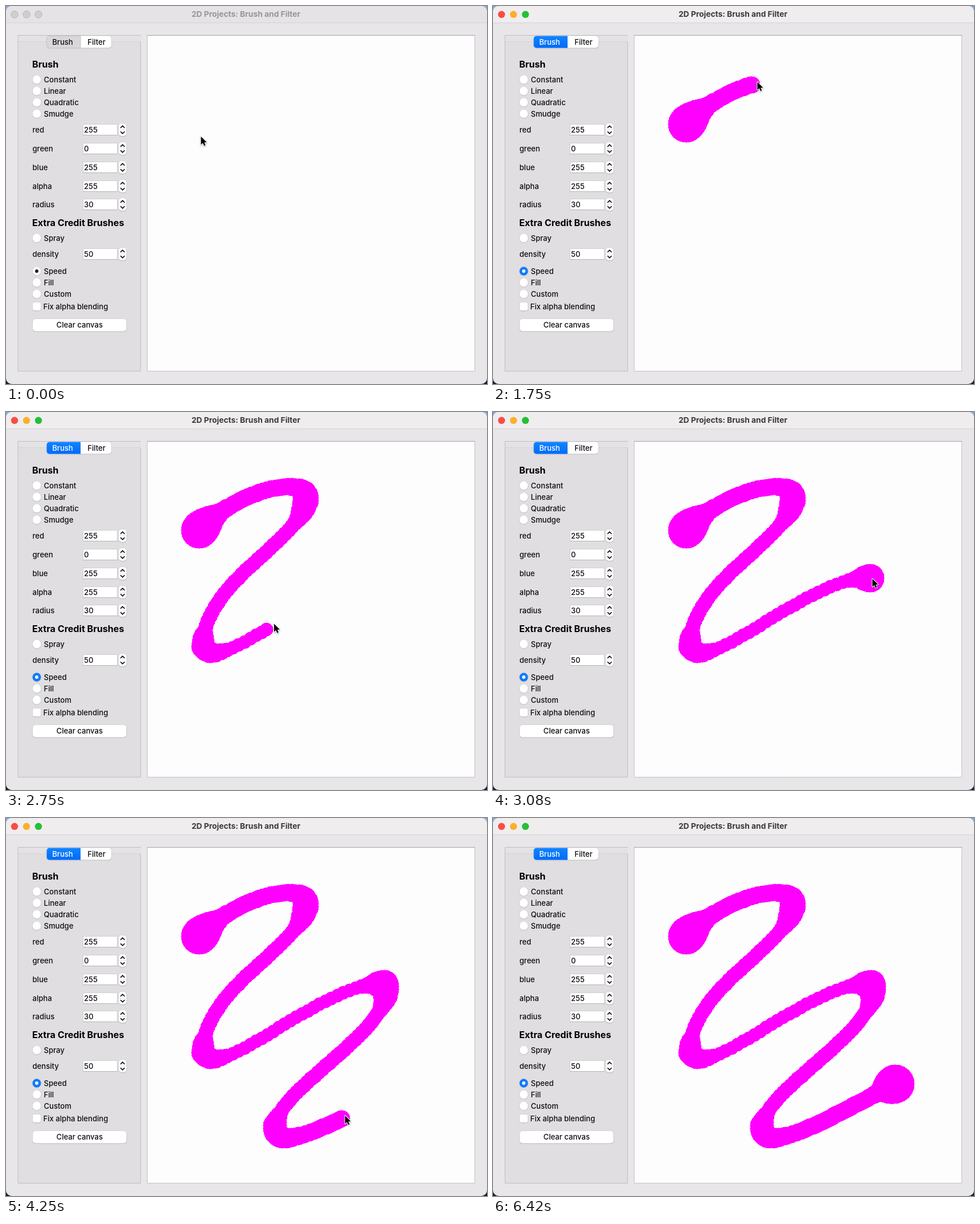
These frames come from a looping animation (845 by 663 pixels, 6.76 s). An HTML page with a canvas:

```html
<!DOCTYPE html>
<html lang="en">
<head>
<meta charset="utf-8">
<title>Brush and Filter</title>
<style>
  html, body { margin: 0; width: 100%; height: 100%; overflow: hidden; background: #e8e6e9; }
  canvas { display: block; width: 845px; height: 663px; }
</style>
</head>
<body>
<canvas id="stage" width="845" height="663"></canvas>
<script>
const ctx = document.getElementById('stage').getContext('2d');
const LOOP = 6760, FPS = 12;
const CLICK = 915, STROKE_START = 1330, STROKE_END = 4950, CURSOR_LEAVES = 5900;
const STAMP_GAP = 16, CURSOR_LEAD = 20;
const FONT = 'Inter, "Open Sans", sans-serif';
const DARK = '#0d0d0e';

// The hand slows at each turn; legs are Bezier curves from turn to turn.
const START = { x: 339, y: 207, r: 32, time: STROKE_START };
const LEGS = [
  { c1: [400, 140], c2: [530, 105], end: { x: 526, y: 152, r: 23, time: 1960 }, thin: 15 },
  { c1: [520, 226], c2: [344, 297], end: { x: 346, y: 410, r: 21, time: 2560 }, thin: 12.5 },
  { c1: [372, 470], c2: [560, 282], end: { x: 664, y: 291, r: 25, time: 3090 }, thin: 12 },
  { c1: [690, 368], c2: [472, 474], end: { x: 472, y: 544, r: 21, time: 3760 }, thin: 12.5 },
  { c1: [478, 594], c2: [600, 520], end: { x: 706, y: 466, r: 33.5, time: STROKE_END }, thin: 15 }
];
const BRAKING = 22, LAUNCH = 34, LEG_STEPS = 60;

const lerp = (a, b, k) => a + (b - a) * k;
const ease = v => { v = Math.max(0, Math.min(1, v)); return v * v * (3 - 2 * v); };
const falloff = (d, reach) => Math.exp(-((d / reach) ** 2));
const bezier = (a, b, c, d, k) => {
  const m = 1 - k;
  return m * m * m * a + 3 * m * m * k * b + 3 * m * k * k * c + k * k * k * d;
};

// The brush is wide when slow, so the radius also gives the pace.
function sampleLeg(start, { c1, c2, end, thin }) {
  const points = [];
  let length = 0, cost = 0;
  for (let i = 0; i <= LEG_STEPS; i++) {
    const k = i / LEG_STEPS, last = points[i - 1];
    const x = bezier(start.x, c1[0], c2[0], end.x, k);
    const y = bezier(start.y, c1[1], c2[1], end.y, k);
    if (last) length += Math.hypot(x - last.x, y - last.y);
    points.push({ x, y, at: length });
  }
  points.forEach((p, i) => {
    p.r = thin + (start.r - thin) * falloff(p.at, LAUNCH)
               + (end.r - thin) * falloff(length - p.at, BRAKING);
    if (i) cost += (p.at - points[i - 1].at) / (37 - p.r);
    p.cost = cost;
  });
  points.forEach(p => { p.t = lerp(start.time, end.time, p.cost / cost); });
  return points;
}
const path = LEGS.flatMap((leg, i) => sampleLeg(i ? LEGS[i - 1].end : START, leg));
const finish = path[path.length - 1];

function brushAt(t) {
  const i = path.findIndex(p => p.t > t);
  if (i < 0) return finish;
  if (i === 0) return path[0];
  const a = path[i - 1], b = path[i], k = (t - a.t) / (b.t - a.t);
  return { x: lerp(a.x, b.x, k), y: lerp(a.y, b.y, k), r: lerp(a.r, b.r, k) };
}

function cursorAt(t) {
  const arrive = 1 - ease((t - 80) / 640);
  const leave = ease((t - CURSOR_LEAVES) / 480);
  const tip = brushAt(t + CURSOR_LEAD);
  return { x: tip.x + 1.5 + 2 * arrive + 160 * leave, y: tip.y - 2 + 24 * arrive - 495 * leave };
}

function paint(fill, stroke) {
  if (fill) { ctx.fillStyle = fill; ctx.fill(); }
  if (stroke) { ctx.strokeStyle = stroke; ctx.lineWidth = 1; ctx.stroke(); }
}
function box(x, y, w, h, radius, fill, stroke) {
  ctx.beginPath();
  ctx.roundRect(x, y, w, h, radius);
  paint(fill, stroke);
}
function disc(x, y, r, fill, stroke) {
  ctx.beginPath();
  ctx.arc(x, y, r, 0, Math.PI * 2);
  paint(fill, stroke);
}
function rect(x, y, w, h, fill) {
  ctx.fillStyle = fill;
  ctx.fillRect(x, y, w, h);
}
function text(str, x, y, { size = 13.1, weight = 500, color = DARK, align = 'left' } = {}) {
  ctx.font = `${weight} ${size}px ${FONT}`;
  ctx.textAlign = align;
  ctx.fillStyle = color;
  ctx.fillText(str, x, y);
}
function raised(draw) {
  ctx.save();
  ctx.shadowColor = 'rgba(0,0,0,0.28)';
  ctx.shadowBlur = 1.6;
  ctx.shadowOffsetY = 0.6;
  draw();
  ctx.restore();
}

function drawWindow(active) {
  rect(0, 0, 845, 332, '#87aee3');
  rect(0, 332, 845, 331, '#17202f');
  box(0, 0, 845, 663, 10, '#e8e6e9');
  box(0, 0, 845, 30, [10, 10, 0, 0], active ? '#f0edef' : '#e6e3e6');
  rect(0, 29, 845, 1, '#d4d2d5');
  ['#fc4c45', '#fbb02b', '#27bf35'].forEach((color, i) =>
    disc(15 + 21 * i, 14.8, 6.2, active ? color : '#cfcdd0', active ? null : '#b7b5b8'));
  text('2D Projects: Brush and Filter', 421.5, 19,
    { size: 13.8, weight: 700, align: 'center', color: active ? '#3b393b' : '#979598' });

  box(21.5, 51.5, 215, 589, 0, '#e0dee1', '#bfbdc0');
  rect(22, 52, 215, 10, '#e4e2e5');
  rect(22, 62, 215, 1, '#d4d2d5');
  box(248.5, 51.5, 575, 589, 0, '#fefdfe', '#c3c1c4');
  rect(248, 51, 576, 1, '#a3a1a4');
}

function drawTabs(active) {
  raised(() => box(71.5, 52.5, 113.5, 21, 5, '#ffffff'));
  const blue = ctx.createLinearGradient(0, 52, 0, 74);
  blue.addColorStop(0, '#1285ff');
  blue.addColorStop(1, '#006af8');
  box(71.5, 52.5, 59.5, 21, [5, 0, 0, 5], active ? blue : '#d9d7da', active ? null : '#c8c6c9');
  text('Brush', 99.5, 68, { align: 'center', color: active ? '#ffffff' : DARK });
  text('Filter', 159, 68, { align: 'center' });
}

function radio(label, y, checked, active) {
  raised(() => disc(54, y, 7.4, checked && active ? '#0a7bff' : '#ffffff'));
  if (checked) disc(54, y, 2.9, active ? '#ffffff' : '#1e1d1f');
  text(label, 66.5, y + 4.9);
}

function chevron(y, dir) {
  ctx.beginPath();
  ctx.moveTo(201.6, y + 1.6 * dir);
  ctx.lineTo(204.8, y - 1.6 * dir);
  ctx.lineTo(208, y + 1.6 * dir);
  ctx.strokeStyle = '#1c1b1d';
  ctx.lineWidth = 1.7;
  ctx.lineCap = ctx.lineJoin = 'round';
  ctx.stroke();
}

function spinBox(label, value, y) {
  text(label, 46.5, y + 4.9);
  rect(135, y - 10, 61, 20, '#d0ced1');
  rect(136, y - 9, 59, 18, '#ffffff');
  rect(135, y + 9, 61, 1, '#b5b3b6');
  text(value, 137, y + 4.9);
  raised(() => box(198, y - 11, 13.6, 22, 5, '#ffffff'));
  rect(198, y - 0.5, 13.6, 1, '#e3e1e4');
  chevron(y - 5.3, 1);
  chevron(y + 5.3, -1);
}

function drawControls(active) {
  const heading = { size: 16.1, weight: 700, color: '#000000' };
  text('Brush', 46, 108, heading);
  ['Constant', 'Linear', 'Quadratic', 'Smudge'].forEach((s, i) => radio(s, 129 + 20 * i, false, active));
  Object.entries({ red: 255, green: 0, blue: 255, alpha: 255, radius: 30 })
    .forEach(([label, value], i) => spinBox(label, value, Math.round(217.2 + 32.8 * i)));
  text('Extra Credit Brushes', 46, 386, heading);
  radio('Spray', 407, false, active);
  spinBox('density', 50, 435);
  ['Speed', 'Fill', 'Custom'].forEach((s, i) => radio(s, 465 + 20 * i, s === 'Speed', active));
  raised(() => box(47, 520, 14, 14, 3, '#ffffff'));
  text('Fix alpha blending', 65.5, 532);
  raised(() => box(47, 549, 164.5, 21.5, 5, '#ffffff'));
  text('Clear canvas', 129.3, 564, { align: 'center' });
}

// Hard-edged round mask, one pixel row at a time.
function stamp({ x, y, r }) {
  const cx = Math.round(x), cy = Math.round(y), n = Math.round(r);
  for (let dy = -n; dy <= n; dy++) {
    const half = Math.floor(Math.sqrt(n * n - dy * dy));
    ctx.fillRect(cx - half, cy + dy, 2 * half + 1, 1);
  }
}

function drawStroke(t) {
  ctx.fillStyle = '#ff00ff';
  for (let s = STROKE_START; s < Math.min(t, STROKE_END); s += STAMP_GAP) stamp(brushAt(s));
  stamp(brushAt(t));
}

function drawCursor({ x, y }) {
  const arrow = new Path2D('M0 0V14.2L3.3 11.2 5.6 16.2 8 15.1 5.8 10.3 10.2 10.1Z');
  ctx.save();
  ctx.translate(x, y);
  ctx.lineJoin = 'round';
  ctx.strokeStyle = '#ffffff';
  ctx.lineWidth = 2;
  ctx.shadowColor = 'rgba(0,0,0,0.35)';
  ctx.shadowBlur = 2.5;
  ctx.shadowOffsetY = 1;
  ctx.stroke(arrow);
  ctx.shadowColor = 'transparent';
  ctx.fillStyle = '#000000';
  ctx.fill(arrow);
  ctx.restore();
}

function render(now) {
  const elapsed = Math.floor((now % LOOP) / 10) * 10;
  const t = Math.floor((elapsed + 9.9) * FPS / 1000) * 1000 / FPS;
  const active = t >= CLICK;
  drawWindow(active);
  drawTabs(active);
  drawControls(active);
  if (active) drawStroke(t);
  drawCursor(cursorAt(t));
  requestAnimationFrame(render);
}
render(0);
</script>
</body>
</html>
```
